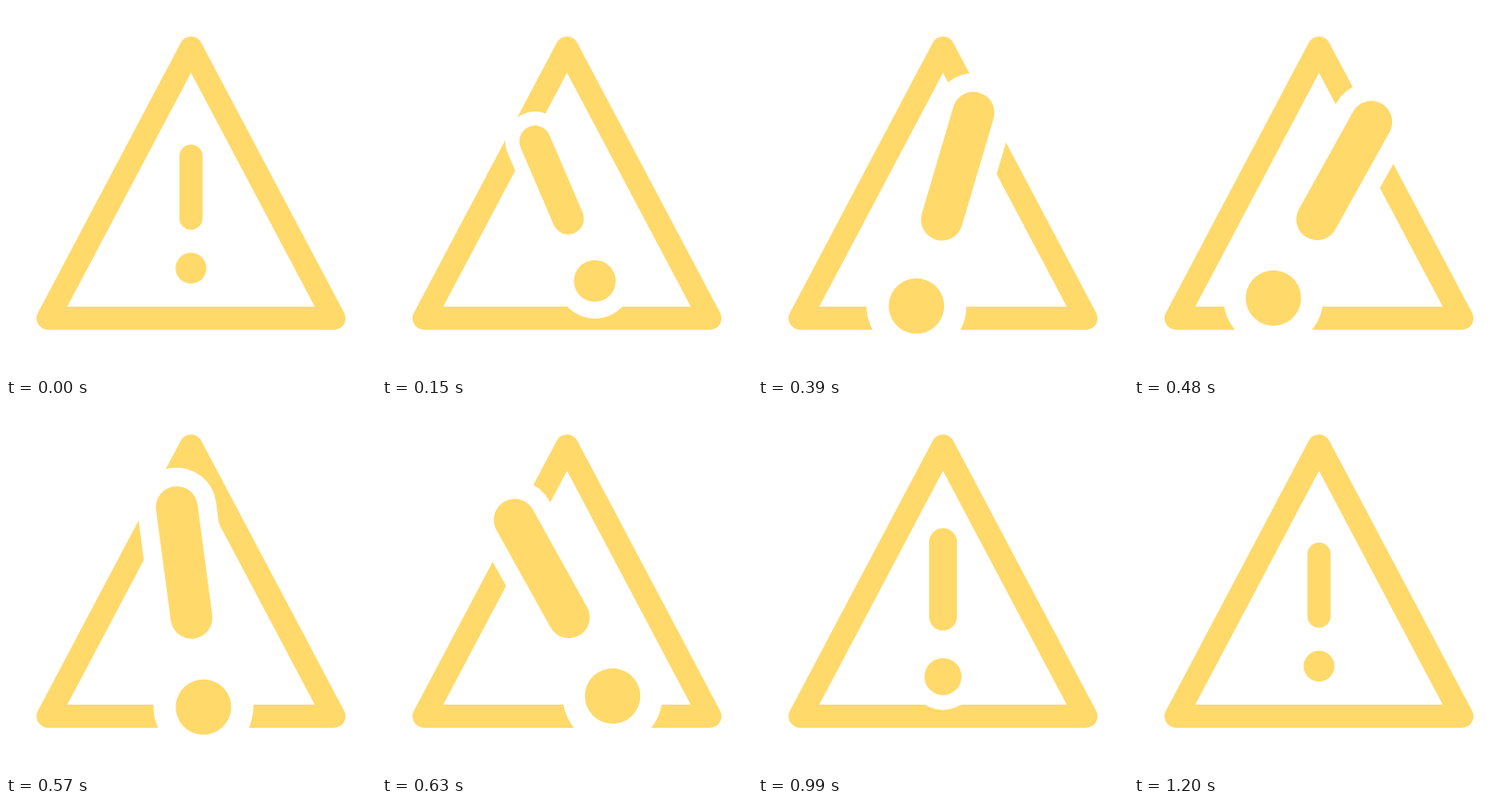
Write an HTML page that moves like this. It is 400 px wide and 400 px high and loops after 1.73 s.

```html
<!DOCTYPE html>
<html lang="en">
<head>
<meta charset="utf-8">
<title>Warning</title>
<style>
  html, body { margin: 0; width: 100%; height: 100%; overflow: hidden; background: #fff; }
  svg { display: block; width: 100vw; height: 100vh; }
  .sign { fill: none; stroke: #ffd96a; stroke-width: 25; stroke-linejoin: round; }
  .halo { fill: #fff; stroke: #fff; }
  .mark { fill: #ffd96a; stroke: #ffd96a; }
  line { stroke-linecap: round; }
  circle { stroke: none; }
</style>
</head>
<body>
<svg viewBox="0 0 400 400">
  <path class="sign" d="M200 45.5L354.5 337.5H45.5Z"/>
  <!-- local origin is the pivot of the exclamation mark -->
  <g id="bang" transform="translate(200 227)">
    <g class="halo">
      <line y1="-64.7" y2="2.3" stroke-width="47.6"/>
      <circle cy="56.4" r="30"/>
    </g>
    <g class="mark">
      <line y1="-64.7" y2="2.3" stroke-width="25.1"/>
      <circle cy="56.4" r="16.65"/>
    </g>
  </g>
</svg>
<script>
  const LOOP = 1730, STEP = 30, LAST = 1200;
  const bang = document.getElementById('bang');

  // [time in ms, value]
  const scaleKeys = [[0, 1], [324, 1.8], [772, 1.8], [1096, 1]];
  const angleKeys = [[0, 0], [217, -30], [467, 30], [643, -30], [860, 0]];

  const smooth = u => u * u * (3 - 2 * u);

  function valueAt(keys, t) {
    const i = keys.findIndex(key => key[0] > t);
    if (i < 0) return keys[keys.length - 1][1];
    const [t0, a] = keys[i - 1], [t1, b] = keys[i];
    return a + (b - a) * smooth((t - t0) / (t1 - t0));
  }

  function draw() {
    const now = performance.now() % LOOP;
    const t = Math.min(LAST, Math.floor(now / STEP) * STEP);
    const angle = valueAt(angleKeys, t), scale = valueAt(scaleKeys, t);
    bang.setAttribute('transform', `translate(200 227) rotate(${angle}) scale(${scale})`);
    requestAnimationFrame(draw);
  }
  draw();
</script>
</body>
</html>
```
